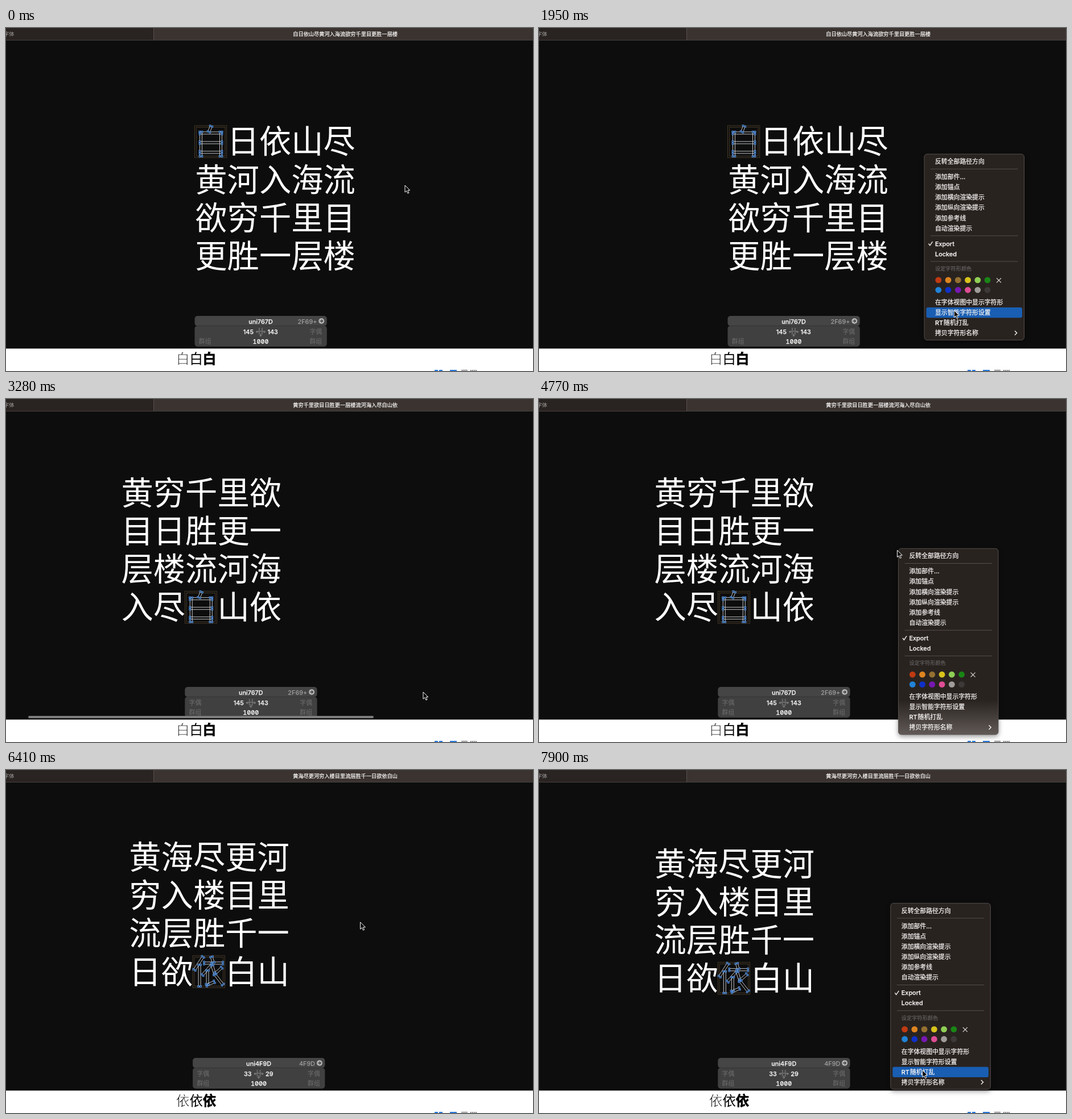
These frames come from a looping animation (926x604 px, 8 s). An HTML page:

```html
<!DOCTYPE html>
<html lang="zh-CN">
<head>
<meta charset="utf-8">
<style>
html, body { margin: 0; width: 100%; height: 100%; overflow: hidden; background: #0d0d0d; }
svg { display: block; width: 926px; height: 604px; }
text { font: 500 10.85px Inter, "Noto Sans CJK SC", sans-serif; fill: #f8f6f5; stroke: #f8f6f5; stroke-width: .25; white-space: pre; }
.title { font-size: 9.2px; }
.dim { fill: #6e6e6e; stroke: none; font-weight: 400; }
.code { fill: #a2a2a2; stroke: none; }
.num { font-feature-settings: "zero", "tnum"; }
.poem, .sample { font: 400 56.3px "Noto Sans CJK SC", "Noto Sans CJK", sans-serif; fill: #fff; stroke: none; }
.sample { font-size: 23.4px; fill: #000; }
.thin { stroke: #fff; stroke-width: .8; }
.heavy { font-weight: 700; stroke: #000; stroke-width: .6; }
</style>
</head>
<body>
<svg id="stage" viewBox="0 0 926 604"></svg>
<script>
const LOOP = 8000, STEP = 149, EM = 56.3, PITCH = 67.2;
const stage = document.getElementById('stage');

// Times are counted in steps; every round opens the menu once
const rounds = [
  { leave: 1, arrive: 6, open: 9, x: 677, y: 222 },
  { leave: 24, arrive: 28, open: 32, x: 631.5, y: 263.3 },
  { leave: 40, arrive: 44, open: 47, x: 617.8, y: 234.7 }];
for (const r of rounds) {
  r.reach = r.open + 6;
  r.close = r.open + 8;
  r.corner = [r.x - 2, r.y + 3];
  r.target = [r.x + 56, r.y + 294];
}
const poems = ['白日依山尽黄河入海流欲穷千里目更胜一层楼',
  '黄穷千里欲目日胜更一层楼流河海入尽白山依', '黄海尽更河穷入楼目里流层胜千一日欲依白山'];
const entries = ['反转全部路径方向', '-', '添加部件...', '添加锚点', '添加横向渲染提示', '添加纵向渲染提示',
  '添加参考线', '自动渲染提示', '-', 'Export', 'Locked', '-', '设定字符形颜色', '在字体视图中显示字符形',
  '显示智能字符形设置', 'RT<tspan dx="1">随机打乱</tspan>', '拷贝字符形名称'];
const swatches = '#bf3a12 #dd8420 #957031 #d8c31c #8fcf55 #1a8516 #2183d8 #1030c8 #7718b2 #de4d94 #9f9c9a #3c3938'.split(' ');

// Centre lines of the strokes within the em box
const glyphs = {
  白: { name: 'uni767D', code: '2F69+', left: 145, right: 143,
    strokes: 'M29 1L25 11' + [13, 30, 47].map(y => `M9 ${y}L48 ${y}`).join('') + [11, 46].map(x => `M${x} 11L${x} 54`).join('') },
  依: { name: 'uni4F9D', code: '4F9D', left: 33, right: 29,
    strokes: 'M18 2L3 25M12 16L12 54M33 2L36 12M20 13L53 13M34 15L17 34M26 26L26 51M24 52L38 46M34 17L39 33L53 51M51 21L40 31' }
};

const text = (x, y, s, cls = '', anchor = 'start') => `<text x="${x}" y="${y}" class="${cls}" text-anchor="${anchor}">${s}</text>`;
const rect = (x, y, w, h, fill, r = 0, attr = '') =>
  `<rect x="${x}" y="${y}" width="${w}" height="${h}" rx="${r}" fill="${fill}" ${attr}/>`;
const path = (d, stroke, width = 1, fill = 'none') =>
  `<path d="${d}" stroke="${stroke}" stroke-width="${width}" fill="${fill}"/>`;
const circle = (x, y, r, fill) => `<circle cx="${x}" cy="${y}" r="${r}" fill="${fill}"/>`;
const at = (x, y, body, opacity = 1) => `<g transform="translate(${x} ${y})" opacity="${opacity}">${body}</g>`;

// Fast start, slow end
function glide(a, b, from, to, k, power) {
  const u = 1 - (1 - Math.min(1, Math.max(0, (k - from) / (to - from)))) ** power;
  return a.map((v, i) => v + (b[i] - v) * u);
}

function pointerAt(k) {
  const i = Math.max(0, rounds.findLastIndex(r => r.leave <= k)), r = rounds[i];
  return k < r.open
    ? glide(i ? rounds[i - 1].target : [701, 277], r.corner, r.leave, r.arrive, k, 1.7)
    : glide(r.corner, r.target, r.open, r.reach, k, 2.5);
}

function outline({ strokes }) {
  let lines = '', nodes = '';
  for (const stroke of strokes.slice(1).split('M')) {
    const points = stroke.split('L').map(p => p.split(' ').map(Number));
    for (let i = 1; i < points.length; i++) {
      const [[x1, y1], [x2, y2]] = points.slice(i - 1);
      const k = 2 / Math.hypot(x2 - x1, y2 - y1), dx = (y1 - y2) * k, dy = (x2 - x1) * k;
      const quad = [[x1 + dx, y1 + dy], [x2 + dx, y2 + dy], [x2 - dx, y2 - dy], [x1 - dx, y1 - dy]];
      lines += path('M' + quad.join('L') + 'Z', '#d4d6da', .9);
      for (const [x, y] of quad) nodes += rect(x - 1.4, y - 1.4, 2.8, 2.8, '#24466f', 0, 'stroke="#5d9df0" stroke-width=".8"');
    }
  }
  const frame = inset => rect(inset, inset, EM - 2 * inset, EM - 2 * inset, 'none', 0, 'stroke="#55452f" stroke-width=".8"');
  return frame(0) + frame(2.8) + lines + nodes;
}

function infoPanel(g, first) {
  let s = rect(0, 507, 232.3, 17.6, '#454545', 5) + rect(0, 524.4, 232.3, 36.6, '#404040', 5) +
    text(116, 520.5, g.name, '', 'middle') + text(215, 520.5, g.code, 'code', 'end') +
    circle(222.8, 516, 5, '#b4b4b4') + path('M219.8 516h5m-2.4-2.6l2.6 2.6-2.6 2.6', '#444', 1.4) +
    text(103.5, 539, g.left, '', 'end') + text(128, 539, g.right) + text(116, 556.3, 1000, 'num', 'middle') +
    path('M113.5 528v12M118.5 528v12M111 534h10', '#686868', 2) +
    path('M110 533l-2 2 2 2M122 533l2 2-2 2M108 535h4m8 0h4M116 538v5m-2-2l2 2 2-2', '#929292');
  for (const x of [7.3, 202]) {
    if (x > 100 || !first) s += text(x, 539, '字偶', 'dim');
    s += text(x, 556.3, '群组', 'dim');
  }
  return s;
}

function menu({ x, y }, pointerY, opacity) {
  const low = y > 250;
  let s = `<defs><linearGradient id="glow" gradientUnits="userSpaceOnUse" x1="0" x2="0" y1="${530 - y}" y2="${592 - y}">
    <stop stop-color="#292320"/><stop offset="1" stop-color="#625b58"/></linearGradient></defs>` +
    rect(0, 0, 175.5, 327.6, low ? 'url(#glow)' : '#292320', 5,
      'stroke="#5c5654" stroke-width=".9" style="filter:drop-shadow(0 3px 4px #0006)"');
  let row = 13;
  for (const label of entries) {
    if (label === '-') {
      s += rect(11, row - 5.3, 153.5, .9, '#5a5451');
      row += 9;
    } else if (label === '设定字符形颜色') {
      s += text(19, row + 2, label, 'title dim');
      swatches.forEach((color, i) =>
        s += circle(24.8 + i % 6 * 17.25, row + 19 + Math.floor(i / 6) * 17.4, 5.4, color));
      s += path(`M127 ${row + 15.5}l8 8m0-8l-8 8`, '#e4e2e1', 1.1);
      row += 58;
    } else {
      if (Math.abs(pointerY - y - row) < 9) s += rect(3.5, row - 9, 168.5, 18.2, low ? '#2470cf' : '#195eb3', 3);
      s += text(19, row + 4, label);
      if (label === 'Export') s += path(`M7.5 ${row}l2.4 3.2 4.6-6.8`, '#f4f2f1', 1.4);
      row += 18.1;
    }
  }
  s += path('M159 311.3l3.7 3.7-3.7 3.7', '#f4f2f1', 1.4);
  return at(x, y, s, opacity);
}

function render(k) {
  // A shuffle follows each closed menu, then the view scrolls into place
  const shuffles = rounds.filter(r => k >= r.close + 2).length;
  const since = shuffles ? k - rounds[shuffles - 1].close : 0;
  const poem = poems[shuffles], caret = shuffles ? 17 : 0, char = poem[caret], glyph = glyphs[char];
  const drift = since < 4 ? 1 : 0;
  const [left, top] = shuffles ? [201.7 + 13.8 * drift, 137.1 - 11.7 * drift] : [331.5, 171.9];
  const cell = i => [left + i % 5 * EM, top + Math.floor(i / 5) * PITCH];
  const [caretX, caretY] = cell(caret);

  let s = rect(0, 0, 926, 604, '#0d0d0d');
  [...poem].forEach((c, i) => {
    const [x, y] = cell(i);
    if (i !== caret) s += text(x + .8, y + EM * .88 - 1, c, 'poem');
  });
  s += at(caretX, caretY, outline(glyph)) + at(caretX, 0, infoPanel(glyph, caret === 0));
  if (since >= 4 && since < 8) s += rect(39, 558, 607, 4, '#7d7d7d', 2);

  s += rect(0, 0, 926, 22, '#3a3330') + rect(0, 0, 259, 22, '#292321') + rect(259, 0, 1, 22, '#554e4b') +
    rect(0, 21, 926, 1, '#47413e') + text(-4, 14, '字体', 'title code') + text(504.3, 14, poem, 'title');

  s += rect(0, 564.5, 926, 40, '#fff');
  ['thin', '', 'heavy'].forEach((weight, i) => s += text(299 + i * 23.4, 591, char, 'sample ' + weight));
  for (const x of [753, 761, 780, 786]) s += rect(x, 602, 6, 2, '#2878dc');
  s += rect(800, 602, 11, 1.2, '#666');
  for (let x = 816; x < 826; x += 3) s += rect(x, 602, 1.6, 2, '#666');

  const pointer = pointerAt(k), open = rounds.find(r => k >= r.open && k <= r.close);
  if (open) s += menu(open, pointer[1], k < open.close ? 1 : .5);
  s += at(...pointer, path('M0 0v12.2l2.9-2.6 2 4.6 2.1-.9-2-4.5h3.8z', '#fff', 1, '#000'));
  stage.innerHTML = s;
}

let shown = -1;
function frame(now) {
  const k = Math.floor(now % LOOP / STEP);
  if (k !== shown) render(shown = k);
  requestAnimationFrame(frame);
}
frame(0);
</script>
</body>
</html>
```
